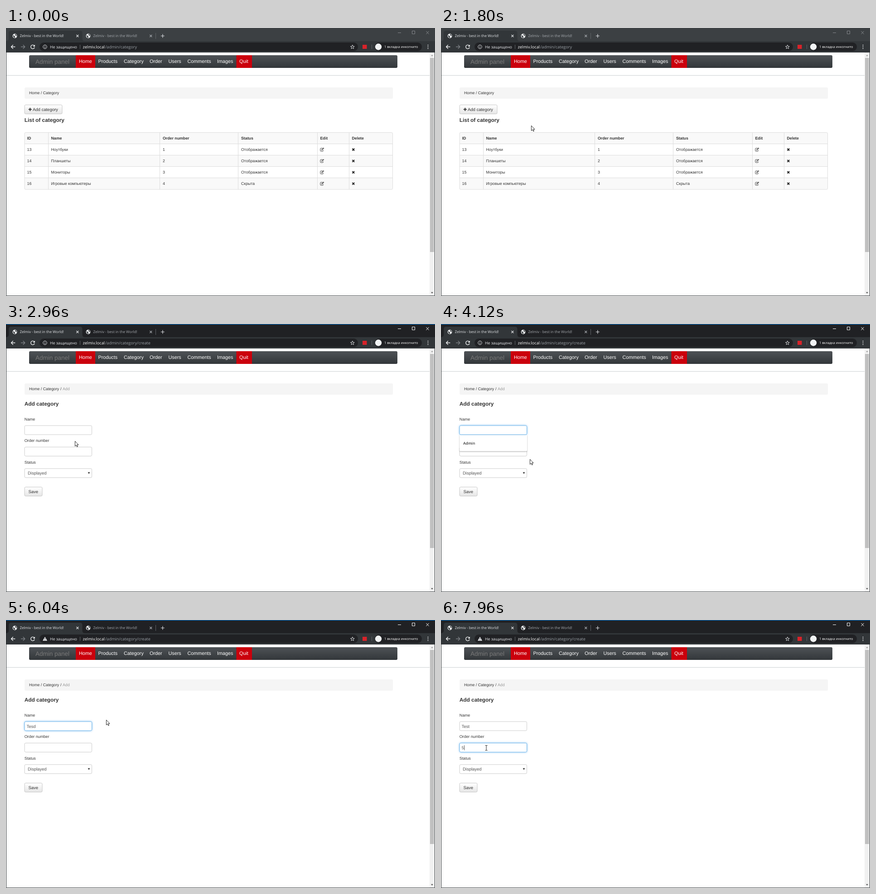
An HTML page that plays this animation: 947x591 px, repeating every 8 s.

```html
<!DOCTYPE html>
<html lang="ru">
<head>
<meta charset="utf-8">
<title>Admin panel</title>
<style>
html, body { margin: 0; width: 100%; height: 100%; overflow: hidden; background: #fff; }
svg { display: block; width: 947px; height: 591px; }
text { white-space: pre; text-rendering: geometricPrecision; }
.ui { font-family: "Open Sans", "Noto Sans", sans-serif; }
.pg { font-family: "Liberation Sans", Arial, sans-serif; }
.focus { filter: drop-shadow(0 0 2px rgba(82,168,236,.7)); }
.popup { filter: drop-shadow(0 1px 1.2px rgba(0,0,0,.35)); }
</style>
</head>
<body>
<svg id="stage" viewBox="0 0 947 591" xmlns="http://www.w3.org/2000/svg">
  <defs>
    <linearGradient id="nav" x2="0" y2="1"><stop stop-color="#4e5256"/><stop offset="1" stop-color="#33373a"/></linearGradient>
    <linearGradient id="btn" x2="0" y2="1"><stop stop-color="#fff"/><stop offset="1" stop-color="#e6e6e6"/></linearGradient>
  </defs>
</svg>
<script>
const LOOP = 8000, STEP = 40;
const stage = document.getElementById('stage');

function el(parent, tag, attrs) {
  const n = document.createElementNS('http://www.w3.org/2000/svg', tag);
  set(n, attrs);
  parent.appendChild(n);
  return n;
}
function set(n, attrs) { for (const k in attrs) n.setAttribute(k, attrs[k]); }
function show(n, on) { n.style.display = on ? '' : 'none'; }
function group(parent) { return el(parent, 'g', {}); }
function rect(p, x, y, w, h, fill, more) { return el(p, 'rect', { x, y, width: w, height: h, fill, ...more }); }
function path(p, d, fill, stroke, width, more) {
  return el(p, 'path', { d, fill: fill || 'none', stroke: stroke || 'none', 'stroke-width': width || 1, ...more });
}
function text(p, x, y, str, size, fill, cls = 'pg', weight = 400) {
  const n = el(p, 'text', { x, y, fill, class: cls, 'font-size': size, 'font-weight': weight });
  n.textContent = str;
  return n;
}

// Browser window
const SITE = 'Zelmiv', HOST = 'zelmiv.local';
const chrome = group(stage);
const frame = rect(chrome, 0, 0, 947, 54, '#202124');
const topLine = rect(chrome, 0, 0, 947, 1, '#0078d7');
rect(chrome, 0, 29, 947, 25, '#323639');
path(chrome, 'M0 29Q6 29 6 23V11Q6 6 11 6H163Q168.500 6 168.500 11V23Q168.500 29 174 29Z', '#323639');

function tab(x, color) {
  const globe = group(chrome);
  set(globe, { transform: `translate(${x} 17.500)` });
  el(globe, 'circle', { r: 4.9, fill: '#eceef0' });
  path(globe, 'M-3.800 -1.500Q-1 -1 -.6 .6T1 2.600Q.6 4 -.8 4.200-3.600 2.500-3.800-1.500ZM-.5-3.900Q1.300-3.600 .8-2.300T2.600-.6Q4 0 4 1.400 4.300-2.600 1.400-3.900Z', '#323639');
  text(chrome, x + 10.900, 20.200, SITE + ' - best in the World!', 8, color, 'ui');
  const c = x + 138.300;
  path(chrome, `M${c - 2.500} 15l5 5m0-5l-5 5`, '', color, 1.1);
}
tab(19.5, '#e3e5e8');
tab(181.5, '#a5a9ae');
rect(chrome, 330, 11, 1, 13, '#5f6368');
path(chrome, 'M341.800 17.500h8m-4-4v8', '', '#dadce0', 1.2);

const winButtons = path(chrome, 'M865 10.500h7M896.500 6.500h6v6.500h-6ZM927.500 7l6 6.500m0-6.500l-6 6.500', '', '#fff', 1);

path(chrome, 'M20.300 41.500H11.500m4.200-4.200L11.500 41.500l4.200 4.200', '', '#f1f3f4', 1.4);
path(chrome, 'M33 41.500h8.800m-4.200-4.200l4.200 4.200-4.200 4.200', '', '#7b7f84', 1.3);
path(chrome, 'M62.300 39A4.200 4.200 0 1 0 63 42.700', '', '#f1f3f4', 1.4);
path(chrome, 'M63.800 36.800v4.300h-4.300Z', '#f1f3f4');

rect(chrome, 74, 32, 703, 19, '#202124', { rx: 9.5 });
const info = group(chrome);
el(info, 'circle', { cx: 86, cy: 41.5, r: 4.2, fill: 'none', stroke: '#e8eaed', 'stroke-width': 1 });
path(info, 'M86 41v2.900M86 38.900v1.100', '', '#e8eaed', 1.1);
const warning = group(chrome);
path(warning, 'M86 37l5 8.700H81Z', '#e8eaed');
path(warning, 'M86 40v2.700M86 43.500v1', '', '#202124', 1);
text(chrome, 97, 44.8, 'Не защищено', 8.75, '#e8eaed', 'ui');
rect(chrome, 163, 37, 1, 9, '#5f6368');
text(chrome, 169.5, 44.8, HOST, 9.1, '#fff', 'ui');
const route = text(chrome, 219, 44.8, '', 9.1, '#9aa0a6', 'ui');

let star = '';
for (let i = 0; i < 10; i++) {
  const r = i % 2 ? 1.9 : 4.6, a = Math.PI * (i / 5 - .5);
  star += (i ? 'L' : 'M') + (764.8 + r * Math.cos(a)).toFixed(2) + ' ' + (41.9 + r * Math.sin(a)).toFixed(2);
}
path(chrome, star + 'Z', '', '#e8eaed', .9);
rect(chrome, 787, 37, 9.5, 9, '#d8232a');
rect(chrome, 807, 36.5, 1, 10, '#5f6368');
rect(chrome, 814, 32, 104, 19, '#202124', { rx: 9.5 });
el(chrome, 'circle', { cx: 822, cy: 41.5, r: 7.2, fill: '#f1f3f4' });
text(chrome, 835, 44.3, '1 вкладка инкогнито', 7.4, '#fff', 'ui', 500);
for (const y of [37.8, 41.5, 45.2]) el(chrome, 'circle', { cx: 931.5, cy: y, r: 1, fill: '#e8eaed' });

// Parts shared by both pages
rect(stage, 0, 54, 947, 537, '#fff');
rect(stage, 935, 54, 11, 536, '#f1f1f1');
rect(stage, 936, 66, 9, 428, '#c1c1c1');
path(stage, 'M938 62l2.500-3 2.500 3Z', '#a3a3a3');
path(stage, 'M938 582.500l2.500 3 2.500-3Z', '#505050');
path(stage, 'M.5 54V590.500H946.500V54', '', '#3c4043', 1);

rect(stage, 51, 60, 813, 28, 'url(#nav)', { rx: 2.7 });
rect(stage, 154, 60, 43, 28, '#cb000c');
rect(stage, 508.5, 60, 34.5, 28, '#cb000c');
text(stage, 65, 78.5, 'Admin panel', 13.5, '#7a7a7a');
const menu = { Home: 161, Products: 203.5, Category: 260, Order: 317, Users: 358.5, Comments: 400.5, Images: 466, Quit: 515 };
for (const name in menu) text(stage, menu[name], 77.2, name, 10.8, '#fff');
rect(stage, 1, 104, 934, 1, '#cbd0d2');
rect(stage, 41, 131, 813, 25, '#f5f5f5', { rx: 2.7 });
text(stage, 51, 146.4, 'Home / Category', 8.77, '#333');

function button(p, x, y, w) {
  return rect(p, x + .5, y + .5, w - 1, 20, 'url(#btn)', { rx: 2.5, stroke: '#c2c2c2', 'stroke-width': .9 });
}

// Category list
const list = group(stage);
const addBtn = button(list, 40.5, 169, 84);
const inset = rect(list, 41.5, 170, 82, 2, '#000', { opacity: .1 });
path(list, 'M49.700 179.500h7m-3.500-3.500v7', '', '#333', 1.9);
text(list, 59, 182.9, 'Add category', 9.47, '#333');
text(list, 40.8, 207, 'List of category', 11.84, '#333', 'pg', 700);

const cols = [46.5, 99.5, 346, 519, 693.5, 763.5];
const rows = [
  ['ID', 'Name', 'Order number', 'Status', 'Edit', 'Delete'],
  ['13', 'Ноутбуки', '1', 'Отображается'],
  ['14', 'Планшеты', '2', 'Отображается'],
  ['15', 'Мониторы', '3', 'Отображается'],
  ['16', 'Игровые компьютеры', '4', 'Скрыта']
];
rows.forEach((row, i) => {
  const mid = 243 + 25.05 * i;
  if (i % 2 === 0) rect(list, 41, mid - 12.5, 813, 25, '#f9f9f9');
  row.forEach((s, j) => text(list, cols[j], mid + 3.2, s, 8.77, '#333', 'pg', i ? 400 : 700));
  if (!i) return;
  rect(list, 41, Math.round(mid - 13), 813, 1, '#ddd');
  const pen = group(list);
  set(pen, { transform: `translate(693.2 ${mid - 4.4})` });
  path(pen, 'M6 1.400H2A1.300 1.300 0 0 0 .7 2.700V6.800A1.300 1.300 0 0 0 2 8.100H5.900A1.300 1.300 0 0 0 7.200 6.800V5.600', '', '#333', .9);
  path(pen, 'M3.400 5.700L8.300 .9', '', '#333', 2);
  path(pen, 'M4.200 4.900L7.400 1.800', '', '#fff', .6);
  path(list, `M764.400 ${mid - 2.300}l4.800 4.800m0-4.800l-4.800 4.800`, '', '#222', 1.9);
});
rect(list, 41, 230.5, 812.5, 125.5, 'none', { rx: 2.7, stroke: '#ddd' });
for (const x of [93, 339, 512, 687, 757]) rect(list, x, 231, 1, 125, '#ddd');

// New category form
const form = group(stage);
text(form, 117.5, 146.4, ' / ', 8.77, '#333');
text(form, 125, 146.4, 'Add', 8.77, '#999');
text(form, 40.8, 180, 'Add category', 11.84, '#333', 'pg', 700);
text(form, 40.8, 213, 'Name', 8.77, '#333');
text(form, 40.8, 260.4, 'Order number', 8.77, '#333');
text(form, 40.8, 307.8, 'Status', 8.77, '#333');

function field(y) {
  const box = rect(form, 41, y, 148.5, 20, '#fff', { rx: 2.7 });
  const value = text(form, 45.5, y + 13.7, '', 9.47, '#555');
  const caret = rect(form, 0, y + 5, .8, 11, '#333');
  return { box, value, caret };
}
function fill(f, str, focused, caretOn) {
  set(f.box, { stroke: focused ? '#6fb5ea' : '#ccc', class: focused ? 'focus' : '' });
  f.value.textContent = str;
  show(f.caret, caretOn);
  if (caretOn) f.caret.setAttribute('x', 46 + f.value.getComputedTextLength());
}
const nameField = field(224), orderField = field(271.3);
fill(field(318.8), '', false, false);
text(form, 48, 332.3, 'Displayed', 9.47, '#555');
path(form, 'M180.700 326.700h4.600l-2.300 4Z', '#333');
button(form, 40.5, 359, 40);
text(form, 49.5, 373.2, 'Save', 9.47, '#333');

const popup = group(form);
rect(popup, 41, 245, 149, 35.5, '#fff', { rx: 1.5, class: 'popup' });
text(popup, 49, 266, 'Admin', 8.3, '#333', 'ui', 600);

// Pointer
const pointer = group(stage);
const halo = el(pointer, 'circle', { r: 8.5, cy: .5, fill: '#f7e600', opacity: .62 });
const shapes = {
  arrow: path(pointer, 'M.4 .4V11.500L3 9.100 4.700 12.900 6.400 12.200 4.800 8.400H8Z', '#fff', '#111', .9),
  hand: path(pointer, 'M-1.200 1Q-1.200-.3 0-.3T1.200 1V5Q1.400 4.200 2.400 4.300T3.500 5.400Q4 4.600 5 5T5.800 6.200Q7.600 5.600 7.700 7.400V10.500Q7.600 12.500 6.400 13.500V15H-.2V13.800L-3.800 9.400Q-4.600 7.900-3.200 7.400-2.400 7.400-1.200 8.800Z', '#fff', '#111', .9),
  beam: path(pointer, 'M-2.500-5.500H-.7L0-4.900 .7-5.500H2.500M0-5V5M-2.500 5.500H-.7L0 4.900 .7 5.500H2.500', '', '#222', 1)
};

// time, x, y
const track = [
  [1080, 787, 562], [1280, 680, 499], [1440, 520, 404], [1640, 318, 285], [1800, 199, 215], [1880, 151, 186],
  [2040, 117, 180], [2160, 110.5, 182], [2360, 110.5, 182], [2720, 145, 230], [2760, 145, 230],
  [2960, 152, 258], [3060, 189, 312], [3120, 183, 330], [3240, 183, 330],
  [3600, 110, 237], [3760, 110, 237], [4080, 182, 284], [4120, 196, 298], [4240, 207, 319], [4440, 207, 300],
  [4760, 207, 270], [4880, 207, 270], [5520, 221, 220], [6760, 221, 220],
  [6980, 200, 178], [7180, 150, 202], [7400, 106, 270], [7600, 100, 282], [8000, 100, 282]
];

function slope(i, k) {
  const a = track[i - 1], b = track[i], c = track[i + 1];
  if (!a || !c) return 0;
  const d1 = (b[k] - a[k]) / (b[0] - a[0]), d2 = (c[k] - b[k]) / (c[0] - b[0]);
  return d1 * d2 <= 0 ? 0 : 2 * d1 * d2 / (d1 + d2);
}
function place(t) {
  let i = 0;
  while (i < track.length - 2 && t >= track[i + 1][0]) i++;
  const a = track[i], b = track[i + 1], h = b[0] - a[0], u = (t - a[0]) / h;
  return [1, 2].map(k =>
    a[k] + (b[k] - a[k]) * u * u * (3 - 2 * u) +
    h * u * (1 - u) * (slope(i, k) * (1 - u) - slope(i + 1, k) * u));
}

const typed = [[0, ''], [4480, 'T'], [4680, 'Te'], [4960, 'Tes'], [5160, 'Tesd'], [5360, 'Tesdt'],
  [6040, 'Tesd'], [6200, 'Tes'], [6400, 'Test']];
const within = (t, a, b) => t >= a && t < b;

function draw(t) {
  const active = t >= 2200, onForm = t >= 2520, open = within(t, 3760, 4480);
  set(frame, { fill: active ? '#202124' : '#3c4043' });
  set(winButtons, { stroke: active ? '#fff' : '#85888c' });
  show(topLine, active);
  show(info, t < 4480);
  show(warning, t >= 4480);
  route.textContent = '/admin/category' + (onForm ? '/create' : '');
  show(list, !onForm);
  show(form, onForm);

  const [x, y] = place(Math.max(t, track[0][0]));
  const onBtn = !onForm && x > 41 && x < 124 && y > 169 && y < 190;
  const pressed = within(t, 2200, 2360);
  set(addBtn, { fill: pressed ? '#e1e1e1' : onBtn ? '#e6e6e6' : 'url(#btn)', stroke: pressed ? '#b0b0b0' : '#c2c2c2' });
  show(inset, pressed);

  const word = typed.filter(s => s[0] <= t).pop()[1];
  const onName = within(t, 3680, 7640), onOrder = t >= 7640;
  fill(nameField, word, onName, onName && word !== '' && !within(t, 6040, 6080));
  fill(orderField, t >= 7960 ? '5' : '', onOrder, onOrder);
  show(popup, open);

  const overName = y > 223 && y < 245, overOrder = y > 271 && y < 292 && !(open && y < 281);
  const inField = onForm && x > 41 && x < 190 && (overName || overOrder);
  const kind = onBtn ? 'hand' : inField ? 'beam' : 'arrow';
  for (const k in shapes) show(shapes[k], k === kind);
  show(halo, pressed || within(t, 3640, 3760) || within(t, 7640, 7760));
  show(pointer, t >= 1080);
  set(pointer, { transform: `translate(${x.toFixed(2)} ${y.toFixed(2)})` });
}

function tick() {
  const t = performance.now() % LOOP;
  draw(Math.floor(t / STEP) * STEP);
  requestAnimationFrame(tick);
}
tick();
</script>
</body>
</html>
```
